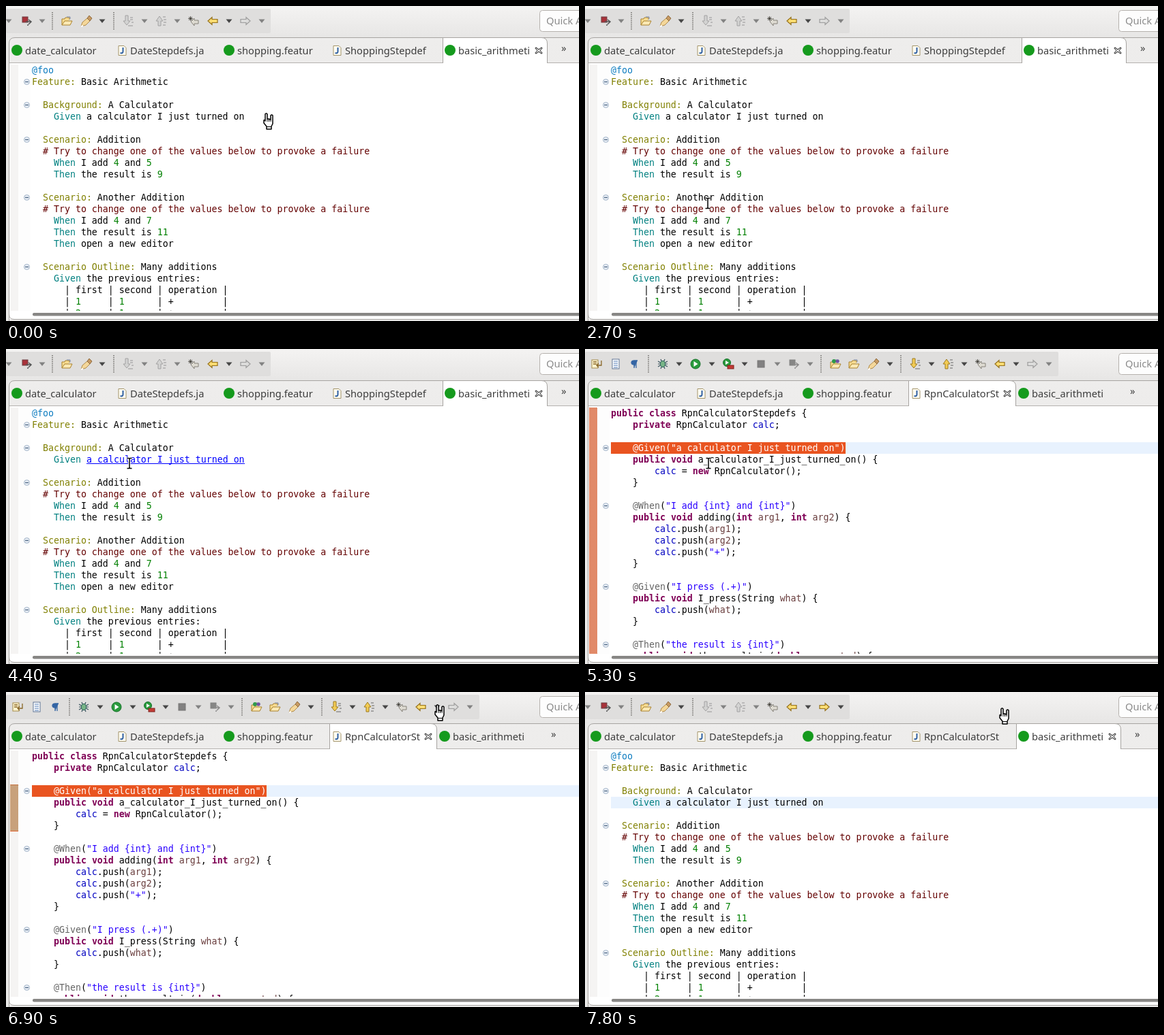
An HTML page that plays this animation: 840 by 463 pixels, repeating every 8 s.

```html
<!DOCTYPE html>
<html lang="en">
<head>
<meta charset="utf-8">
<title>Step navigation</title>
<style>
html, body { margin: 0; width: 100%; height: 100%; overflow: hidden; background: #e9e8e7; }
svg { display: block; width: 840px; height: 463px; }
text { white-space: pre; }
.code { font: 13.289px "DejaVu Sans Mono", monospace; fill: #000; }
.ui { font: 14.67px "Noto Sans", "Open Sans", sans-serif; fill: #3c3c3c; }
.kw { fill: #7f0055; font-weight: bold; }
.str { fill: #2a00ff; }
.ann { fill: #646464; }
.field { fill: #0000c0; }
.arg { fill: #6a3e3e; }
.head { fill: #808000; }
.step { fill: #008080; }
.note { fill: #640000; }
.num { fill: #008000; }
.tag { fill: #0d7cc0; }
.inv, .inv tspan { fill: #fff; }
.link { fill: #0000ff; }
</style>
</head>
<body>
<svg viewBox="0 0 840 463" id="stage"></svg>
<script>
const LOOP = 8000, ROW = 17, TOP = 86, LEFT = 38;

const featureText = `@foo
Feature: Basic Arithmetic

  Background: A Calculator
    Given a calculator I just turned on

  Scenario: Addition
  # Try to change one of the values below to provoke a failure
    When I add 4 and 5
    Then the result is 9

  Scenario: Another Addition
  # Try to change one of the values below to provoke a failure
    When I add 4 and 7
    Then the result is 11
    Then open a new editor

  Scenario Outline: Many additions
    Given the previous entries:
      | first | second | operation |
      | 1     | 1      | +         |
      | 2     | 1      | +         |`;

const javaText = `public class RpnCalculatorStepdefs {
    private RpnCalculator calc;

    @Given("a calculator I just turned on")
    public void a_calculator_I_just_turned_on() {
        calc = new RpnCalculator();
    }

    @When("I add {int} and {int}")
    public void adding(int arg1, int arg2) {
        calc.push(arg1);
        calc.push(arg2);
        calc.push("+");
    }

    @Given("I press (.+)")
    public void I_press(String what) {
        calc.push(what);
    }

    @Then("the result is {int}")
    public void the_result_is(double expected) {`;

const feature = {
  text: featureText, folds: [1, 3, 6, 11, 17],
  rule: /(#.*)|(@\w+)|((?:Feature|Background|Scenario Outline|Scenario):)|\b(Given|When|Then)\b|\b(\d+)\b/g,
  styles: ["note", "tag", "head", "step", "num"]
};
const java = {
  text: javaText, folds: [3, 8, 15, 20], selected: 3,
  rule: /("[^"]*")|(@\w+)|\b(public|class|private|void|new|int|double)\b|\b(calc)\b|\b(arg\d|what|expected)\b/g,
  styles: ["str", "ann", "kw", "field", "arg"]
};

const rect = (x, y, w, h, fill, more = "") =>
  `<rect x="${x}" y="${y}" width="${w}" height="${h}" fill="${fill}" ${more}/>`;
const path = (d, fill, stroke = "none", w = 1, more = "") =>
  `<path d="${d}" fill="${fill}" stroke="${stroke}" stroke-width="${w}" ${more}/>`;
const circle = (x, y, r, fill, stroke = "none") =>
  `<circle cx="${x}" cy="${y}" r="${r}" fill="${fill}" stroke="${stroke}"/>`;
const at = (x, y, body, more = "") => `<g transform="translate(${x} ${y})" ${more}>${body}</g>`;
const text = (x, y, cls, body) => `<text x="${x}" y="${y}" class="${cls}">${body}</text>`;
const baseline = i => TOP + ROW * i + 13;

function paint(line, { rule, styles }) {
  return line.replace(rule, (m, ...g) => {
    const k = styles.findIndex((_, i) => g[i] !== undefined);
    return `<tspan class="${styles[k]}">${m}</tspan>`;
  });
}

function editor(doc, current) {
  let s = rect(5, 84, 835, 376, "#fff") + rect(6, 86, 12, 362, "#f5f4f3") + rect(18, 86, 18, 362, "#fdfdfd");
  if (current !== undefined) s += rect(LEFT, TOP + ROW * current, 802, ROW, "#e8f2fe");
  if (doc.selected) s += rect(LEFT, TOP + ROW * doc.selected, 344, ROW, "#e95420");
  s += `<g clip-path="url(#page)">` + doc.text.split("\n").map((line, i) =>
    text(LEFT, baseline(i), i === doc.selected ? "code inv" : "code", paint(line, doc))).join("") + "</g>";
  for (const i of doc.folds) {
    const y = TOP + ROW * i + 8.5;
    s += circle(30.5, y, 4, "#e6ecf4", "#a3b4c8") + path(`M28 ${y}h5`, "none", "#45607f", 1.2);
  }
  return s + rect(39, 451, 820, 4.5, "#878684", 'rx="2"');
}

// Toolbar icons, each centred on its own origin
const icon = {
  tri: () => path("M-4.5 -2.5h9L0 3z", "#464646"),
  dots: () => Array.from({ length: 9 }, (_, i) => rect(-1, -13 + i * 3, 2, 1.6, "#8d8b89")).join(""),
  stop: () => rect(-5, -5, 10, 10, "#b0282c", 'stroke="#7d1d20"'),
  skip: () => rect(-6, -6, 8, 8, "#a8323a", 'stroke="#6d3c40"') + path("M-1 1h7M3 -2l4 3-4 4M1 6h2", "none", "#555", 1.5),
  folder: () => path("M-7 6V-3h4l1-2h6v3", "#f7dc92", "#a9812d") + path("M-7 6l4-6H8L5 6z", "#fbe9b4", "#a9812d") + path("M0 -6h5v3", "none", "#7a88a8"),
  type: () => icon.folder() + circle(-2, -4, 3, "#2f9a4a") + circle(3, -4, 2.6, "#7350a4"),
  wand: () => path("M-8 8l2-6 7-6 4 4-6 6z", "#f4d79a", "#b08b4c") + path("M1 -4l3-4 4 4-3 4z", "#c79a63", "#8f6b3f") + path("M-8 8l3-1", "none", "#fff", 2),
  next: () => path("M-4 -8h4v8h3L-2 6l-5-6h3z", "#f3cc55", "#9c7a20") + path("M3 -5h4M3 -2h4M5 2h3M0 7h7", "none", "#666"),
  prev: () => path("M-4 7h4V0h3l-5-7-5 7h3z", "#f3cc55", "#9c7a20") + path("M3 -6h4M4 -2h4M4 2h4M3 6h4", "none", "#666"),
  left: () => path("M-7 0l6-5.5V-2.5h8v5H-1v3z", "#fbdc72", "#94701a", 1.2),
  right: () => path("M7 0l-6-5.5V-2.5h-8v5H1v3z", "#fbdc72", "#94701a", 1.2),
  last: () => path("M-4 1l5-5v3h6v5H1v3z", "#dedbd2", "#86827a") + path("M-7 -6l5 5M-2 -6l-5 5M-4.500 -7v7M-8 -3.500h7", "none", "#54524c"),
  bug: () => path("M-7 -4l14 8M7 -4l-14 8M-7 0H7M-3 -7l6 14M3 -7l-6 14", "none", "#36505a", 1.2) + `<ellipse rx="3.6" ry="4.6" fill="#78b487" stroke="#2b655c"/>`,
  run: () => circle(0, 0, 7, "#2a9b3d", "#15702a") + path("M-2.500 -4l6 4-6 4z", "#fff"),
  tool: () => circle(-2, -2, 5.5, "#2a9b3d", "#15702a") + path("M-4 -5l5 3-5 3z", "#fff") + rect(-1, 2, 9, 5, "#c33b35", 'stroke="#7e211d"'),
  block: () => rect(-5, -7, 10, 14, "#fff", 'stroke="#5f7595"') + path("M-3 -4h6M-3 -1h6M-3 2h6M-3 5h6", "none", "#4d79b5"),
  wrap: () => rect(-7, -6, 9, 12, "#fdf3ce", 'stroke="#a38b4d"') + path("M-5 -3h5M-5 0h5M7 -5v7H0M3 -1L0 2l3 3", "none", "#886726", 1.3),
  pilcrow: () => path("M-1 6V-5h5M2 6V-5M-1 -5q-4 0-4 3t4 3z", "#3465a4", "#3465a4", 1.3)
};
const grey = 'style="filter:grayscale(1)" opacity=".6"';

// "name x" pairs; a trailing "-" marks a disabled button
function toolbar(width, items) {
  return rect(0, 4, width, 36, "#dfdedd", 'rx="2"') + items.split(",").map(item => {
    const [name, x] = item.trim().split(" ");
    return at(parseInt(x), 22, icon[name](), x.endsWith("-") ? grey : "");
  }).join("");
}

const longBar = toolbar(694, `wrap 17, block 45, pilcrow 73, dots 93, bug 114, tri 138, run 162, tri 186,
  tool 210, tri 234, stop 258-, tri 282-, skip 306-, tri 330-, dots 346, type 367, folder 394, wand 423,
  tri 447, dots 463, next 484, tri 508, prev 532, tri 556, last 580, left 608, tri 632, right 656-, tri 680-`);
const shortBar = end => toolbar(388, `tri 4-, skip 30, tri 53-, dots 68, folder 89, wand 118, tri 141, dots 158,
  next 179-, tri 203-, prev 227-, tri 251-, last 275, left 303, tri 327, right 351${end}, tri 375${end}`);

const closeMark = x => path(`M${x - 4} 61l4 3 4-3 1 1-3 3.500 3 3.500-1 1-4-3-4 3-1-1 3-3.500-3-3.500z`, "#fff", "#4a4a4a", 1.1);
const leaf = x => circle(x, 65, 8, "#159a1d");
const page = x => path(`M${x - 5} 58.500h8l3 3v11h-11z`, "#fffdf2", "#a3946a") +
  path(`M${x + 1.5} 61v6q0 3-4 2`, "none", "#2e5fa3", 2);
const tabShape = (a, b) => `M${a + .5} 84V46.500H${b - 9}Q${b - .5} 46.500 ${b - .5} 55V84`;

function tabs(names, from, to, chevron) {
  let s = path("M4.500 463V55Q4.500 46.500 13 46.500H841V84H4.500z", "url(#strip)", "#a7a4a1");
  s += path("M5 83.500H840", "none", "#b4b1ae");
  s += path(tabShape(from, to), "#fff", "#a7a4a1") + rect(from + 1, 82, to - from - 2, 3, "#fff");
  for (const [x, name] of names) s += (/Step|Rpn/.test(name) ? page : leaf)(x - 12) + text(x, 71, "ui", name);
  return s + closeMark(to - 13) + text(chevron - 5, 67, "ui", "»");
}

const common = [[28, "date_calculator"], [182, "DateStepdefs.ja"], [339, "shopping.featur"]];
const rpn = [[497, "RpnCalculatorSt"], [655, "basic_arithmeti"]];
const scene = (id, ...parts) => `<g id="${id}">${parts.join("")}</g>`;
const border = path("M4.500 55V453Q4.500 460.500 12 460.500H841", "none", "#a7a4a1");
const link = (id, x, row, words) => scene(id,
  rect(x, TOP + ROW * row, words.length * 8, ROW, "#fff"),
  text(x, baseline(row), "code link", words),
  rect(x, baseline(row) + 1, words.length * 8, 1, "#00f"));

stage.innerHTML = `<defs>
  <linearGradient id="back" x2="0" y2="1"><stop stop-color="#f4f3f2"/><stop offset="1" stop-color="#e7e6e5"/></linearGradient>
  <linearGradient id="strip" x2="0" y2="1"><stop stop-color="#eeedec"/><stop offset="1" stop-color="#e7e6e5"/></linearGradient>
  <clipPath id="page"><rect x="36" y="84" width="804" height="364"/></clipPath>
  <pattern id="hatch" width="2" height="2" patternUnits="userSpaceOnUse">${rect(0, 0, 2, 2, "#f3c9b4")}${rect(0, 0, 1, 1, "#cf4a1c")}${rect(1, 1, 1, 1, "#cf4a1c")}</pattern>
  <pattern id="weave" width="2" height="2" patternUnits="userSpaceOnUse">${rect(0, 0, 2, 2, "#ecd9bd")}${rect(0, 0, 1, 1, "#a4693a")}${rect(1, 1, 1, 1, "#a4693a")}</pattern>
</defs>` +
  rect(0, 0, 840, 463, "#e9e8e7") + rect(0, 0, 840, 46, "url(#back)") +
  scene("start", shortBar("-"), tabs([...common, [497, "ShoppingStepdef"], [663, "basic_arithmeti"]], 640, 794, 819), editor(feature)) +
  scene("steps", longBar, tabs([...common, ...rpn], 474, 632, 804), editor(java, 3)) +
  scene("back2", shortBar(""), tabs([...common, ...rpn], 632, 786, 811), editor(feature, 4)) +
  scene("fullRuler", rect(6, 86, 12, 362, "url(#hatch)")) +
  scene("partRuler", rect(6, 137, 12, 68, "url(#weave)"), rect(6, 136, 12, 1, "#c4703c"), rect(6, 204, 12, 1, "#e06a35")) +
  scene("tabHover", path(tabShape(316, 473), "#fafafa", "#b4b1ae"), leaf(328), text(339, 71, "ui", "shopping.featur"), closeMark(460)) +
  scene("btnHover", rect(596.5, 9.5, 24, 26, "#ecebea", 'rx="3" stroke="#a9a6a3"'), at(608, 22, icon.left())) +
  link("linkResult", 110, 9, "the result is 9") +
  link("linkGiven", 118, 4, "a calculator I just turned on") +
  border + rect(782.5, 6.5, 80, 31, "#fdfdfd", 'rx="4" stroke="#b5b1ad"') +
  `<text x="792" y="27" class="ui" style="fill:#8a8a8a">Quick Access</text>` +
  scene("beam", ["#fff", "#000"].map((c, i) =>
    path("M-3.500 -7.500H-1L0 -6.500 1 -7.500H3.500M0 -6.500V6.500M-3.500 7.500H-1L0 6.500 1 7.500H3.500", "none", c, i ? 1.5 : 3.5)).join("")) +
  scene("hand", path("M-5 -10Q-3.500 -12.500 -2 -10V-3H0.500L3 -2V-8Q4.500 -10 6 -8V4L4 8V12H-3V8L-7 3V-1Q-6 -2.500 -5 0z", "#fff", "#000", 1.5, 'stroke-linejoin="round"') +
    path("M-2 -3V1M0.500 -3V1M3 -2V1M-3 8.500H4", "none", "#000")) +
  scene("wait", circle(0, 0, 9, "#fff", "#222") + `<circle r="6.6" fill="none" stroke="#000" stroke-width="2.2" stroke-dasharray="1.8 1.655"/>`);

// Pointer keys: time, x, y
const keys = [
  [0, 385, 169], [299, 385, 169], [300, 382, 167], [700, 382, 167], [1000, 275, 150], [1300, 186, 142],
  [1400, 186, 142], [1600, 180, 215], [1800, 173, 345], [2000, 170, 414], [2300, 176, 361],
  [2700, 180, 290], [3000, 178, 251], [3100, 178, 251], [3500, 176, 224], [4000, 177, 184],
  [4400, 181, 168], [6100, 181, 168], [6300, 300, 105], [6400, 385, 66], [6600, 560, 34],
  [6800, 675, 22], [7000, 596, 37], [7100, 615, 38], [7300, 615, 38], [7400, 615, 35],
  [7499, 615, 35], [7500, 611, 27], [7799, 611, 27], [7800, 615, 35], [8000, 615, 35]
];

function pointer(t) {
  const i = keys.findIndex(k => k[0] > t);
  const [t0, x0, y0] = keys[i - 1], [t1, x1, y1] = keys[i];
  const p = (t - t0) / (t1 - t0);
  return [Math.round(x0 + (x1 - x0) * p), Math.round(y0 + (y1 - y0) * p)];
}

const node = id => document.getElementById(id);
const show = (id, on) => { node(id).style.display = on ? "" : "none"; };

function draw(now) {
  const t = Math.floor((now % LOOP) / 100) * 100;
  const during = (a, b) => t >= a && t < b;
  show("start", t < 5200);
  show("steps", during(5200, 7800));
  show("back2", t >= 7800);
  show("fullRuler", during(5200, 5800));
  show("partRuler", during(5800, 7800));
  show("tabHover", during(6400, 6500));
  show("btnHover", during(7400, 7800));
  show("linkResult", during(3000, 3200));
  show("linkGiven", during(4400, 5200));

  const kind = during(7500, 7800) ? "wait" : t < 300 || t >= 6400 ? "hand" : "beam";
  const [x, y] = pointer(t);
  for (const id of ["beam", "hand", "wait"]) show(id, id === kind);
  const spin = kind === "wait" ? ` rotate(${(t - 7500) * .3})` : "";
  node(kind).setAttribute("transform", `translate(${x} ${y})${spin}`);
  requestAnimationFrame(draw);
}
draw(0);
</script>
</body>
</html>
```
